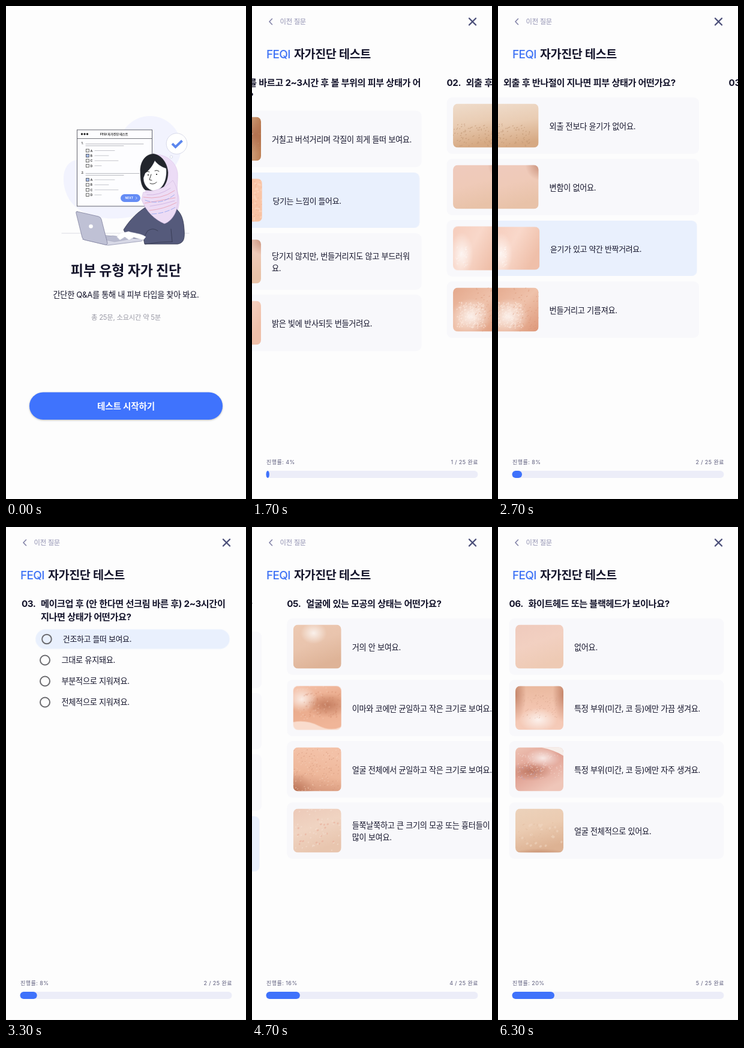
An HTML page that plays this animation: 400 by 820 pixels, repeating every 6400 ms.

```html
<!DOCTYPE html>
<html lang="ko">
<head>
<meta charset="utf-8">
<title>피부 유형 자가 진단</title>
<style>
html, body { margin: 0; width: 100%; height: 100%; overflow: hidden; background: #fdfdfd; }
svg { display: block; width: 100vw; height: 100vh; overflow: hidden; }
text { font-family: Inter, "Noto Sans CJK KR", "Noto Sans CJK", sans-serif; fill: #14142b; }
.ask { font-size: 15.2px; font-weight: 700; letter-spacing: -.45px; word-spacing: .03em; }
.opt { font-size: 13.2px; letter-spacing: -.32px; }
.name { font-size: 19.6px; font-weight: 700; letter-spacing: -.45px; word-spacing: .03em; }
.name.brand { font-size: 19px; font-weight: 500; letter-spacing: -.65px; fill: #3f73f5; }
.back { font-size: 11.3px; letter-spacing: -.25px; fill: #8f8fb0; }
.stat { font-size: 9px; letter-spacing: .5px; word-spacing: -.03em; fill: #5c5c7c; }
.tiny { font-size: 5.4px; font-weight: 600; fill: #333; }
.press { transform-box: fill-box; transform-origin: center; }
</style>
</head>
<body>
<svg id="stage" viewBox="0 0 400 820">
  <defs>
    <clipPath id="round"><rect width="80" height="73" rx="8"/></clipPath>
    <radialGradient id="glow">
      <stop stop-color="#fff" stop-opacity=".75"/><stop offset="1" stop-color="#fff" stop-opacity="0"/>
    </radialGradient>
    <radialGradient id="shade">
      <stop stop-color="#a4583c" stop-opacity=".55"/><stop offset="1" stop-color="#a4583c" stop-opacity="0"/>
    </radialGradient>
  </defs>
</svg>
<script>
const LOOP = 6400, SLIDE = 450;
const BRAND = 'FEQI', TITLE = '자가진단 테스트';
let css = '', defs = '', seed = 7, uid = 0;

const rand = () => (seed = seed * 16807 % 2147483647) / 2147483647;
const text = (x, y, cls, s, more = '') => `<text x="${x}" y="${y}" class="${cls}" ${more}>${s}</text>`;
const path = (d, stroke, w = 1, fill = 'none', more = '') =>
  `<path d="${d}" stroke="${stroke}" stroke-width="${w}" fill="${fill}" stroke-linecap="round" stroke-linejoin="round" ${more}/>`;
const rect = (x, y, w, h, r, fill, more = '') =>
  `<rect x="${x}" y="${y}" width="${w}" height="${h}" rx="${r}" fill="${fill}" ${more}/>`;
const circle = (x, y, r, fill, more = '') => `<circle cx="${x}" cy="${y}" r="${r}" fill="${fill}" ${more}/>`;

// Stops are [ms, declarations].
function animate(id, stops, easing = 'ease-in-out') {
  const body = stops.map(([t, p]) => `${t / LOOP * 100}%{${p}}`).join('');
  css += `@keyframes ${id}{${body}}#${id}{animation:${id} ${LOOP}ms ${easing} infinite}`;
}
function slide(id, enter, leave) {
  const x = v => `transform:translateX(${v}px)`;
  const stops = enter ? [[0, x(400)], [enter, x(400)], [enter + SLIDE, x(0)]] : [[0, x(0)]];
  if (leave) stops.push([leave, x(0)], [leave + SLIDE, x(-400)], [LOOP, x(-400)]);
  else stops.push([LOOP, x(0)]);
  animate(id, stops);
}
function press(id, at) {
  const s = v => `transform:scale(${v})`;
  animate(id, [[0, s(1)], [at, s(1)], [at + 100, s(.98)], [LOOP, s(.98)]], 'linear');
}
function show(id, from, to = LOOP) {
  const o = v => `opacity:${v}`;
  const stops = from ? [[0, o(0)], [from, o(1)]] : [[0, o(1)]];
  if (to < LOOP) stops.push([to, o(0)]);
  stops.push([LOOP, o(to < LOOP ? 0 : 1)]);
  animate(id, stops, 'step-end');
}

// Skin swatches: tones, gradient end, soft spots [kind,cx,cy,rx,ry], flecks [count,colour,size,x,y,w,h].
const SMOOTH = { tones: ['#efcabd', '#efcab8', '#e8c2a8'], end: [.3, 1], spots: [['shade', 84, 0, 26, 26]] };
const SHINY = { tones: ['#f6cdbd', '#f9d8ca', '#efbfa9'], end: [1, .5], spots: [['glow', 14, 46, 20, 36]],
  flecks: [[45, '#fff', 1, 4, 34, 20, 34]] };
const SKINS = {
  flaky: { tones: ['#dfb890', '#e5c8ae', '#bd7f54'], end: [1, 0], spots: [['shade', 70, 30, 26, 30], ['shade', 34, 20, 8, 8]],
    flecks: [[150, '#f5eadf', 1.1, 0, 25, 66, 48], [60, '#c79a77', 1, 0, 10, 80, 60]] },
  tight: { tones: ['#f4ae8d', '#fac7a9', '#f8c0a0'], end: [1, 1],
    flecks: [[110, '#fddcc6', 2.6, 0, 6, 80, 67], [90, '#f0a988', 1.3, 0, 0, 80, 73]] },
  smooth: SMOOTH,
  shiny: SHINY,
  dull: { tones: ['#efdccb', '#e9ccb3', '#d6a983'], end: [.2, 1], flecks: [[85, '#b98d6b', 1.3, 0, 34, 66, 38]] },
  oily: { tones: ['#e4a88c', '#efc2ab', '#dd9778'], end: [1, 1], spots: [['glow', 30, 48, 34, 30]],
    flecks: [[150, '#fff3ec', 1.5, 6, 24, 48, 44], [60, '#d58d6e', 1.1, 36, 0, 44, 73]] },
  partly: { tones: ['#e8c6aa', '#efcdbe', '#e2a38e'], end: [.4, 1], spots: [['glow', 34, 44, 44, 22]],
    flecks: [[50, '#fff', .8, 6, 30, 54, 30]] },
  tzone: { tones: ['#ecc4a2', '#f1d0b5', '#e9bd9b'], end: [1, 1], spots: [['glow', 40, 40, 26, 30]],
    flecks: [[65, '#fbeadb', 1.2, 4, 6, 70, 62], [16, '#dc9d80', 1.5, 4, 6, 70, 62]] },
  greasy: { tones: ['#a95c46', '#d99780', '#efbfae'], end: [.5, 1], spots: [['glow', 42, 34, 32, 24], ['shade', 8, 10, 36, 26]],
    flecks: [[110, '#fbe5dc', 1.2, 14, 8, 60, 44], [40, '#b76b55', 1.1, 0, 0, 60, 50]] },
  clear: { tones: ['#edc9b2', '#e9c4ad', '#deb397'], end: [.4, 1], spots: [['glow', 34, 14, 22, 18]] },
  nosePores: { tones: ['#f5c2aa', '#eaab8c', '#f0b598'], end: [.3, 1], spots: [['shade', 56, 32, 38, 20], ['glow', 14, 22, 26, 22]],
    flecks: [[80, '#c87c5e', 1.2, 16, 10, 62, 42], [50, '#f9d8c6', 1.3, 0, 0, 60, 56]],
    shape: ['M0 60Q22 56 42 66T80 68V73H0Z', '#f9dccd'] },
  allPores: { tones: ['#f3c1a7', '#eeb79a', '#cf8e72'], end: [-.2, 1], spots: [['shade', 0, 73, 36, 30]],
    flecks: [[100, '#cf8f74', 1.2, 0, 4, 80, 67], [90, '#f8d3be', 1.3, 0, 0, 80, 73]] },
  scars: { tones: ['#ecc9b8', '#f0d4c2', '#e8c5ae'], end: [.4, 1],
    flecks: [[20, '#e8a592', 2.6, 4, 16, 72, 44], [50, '#f8e4d8', 1.8, 0, 0, 80, 73]] },
  plain: { tones: ['#efcabd', '#f2d0c1', '#eecab4'], end: [.4, 1] },
  nose: { tones: ['#eab99f', '#f3c5b0', '#f5cbb9'], end: [0, 1], spots: [['shade', 0, 14, 18, 46], ['shade', 80, 14, 18, 46], ['glow', 38, 56, 32, 20]],
    flecks: [[75, '#d19c84', 1, 12, 14, 56, 40]] },
  chin: { tones: ['#eec3b4', '#e0a092', '#efc6b9'], end: [.6, 1], spots: [['shade', 26, 40, 36, 16], ['glow', 46, 18, 30, 16]],
    flecks: [[100, '#fae4dc', 1.2, 4, 10, 72, 42], [28, '#a5a8dc', 1, 4, 30, 40, 24]], shape: ['M42 0H80V14Q64 4 42 0Z', '#f6eeea'] },
  bumps: { tones: ['#ecd2bb', '#ebcbb1', '#ddb293'], end: [.3, 1], spots: [['shade', 40, 78, 50, 12]],
    flecks: [[20, '#f2dac5', 3.4, 2, 26, 76, 38], [45, '#ddb697', 1.2, 0, 20, 80, 50]] }
};
function photo(key, x, y) {
  const { tones, end, spots = [], flecks = [], shape } = SKINS[key], id = 'skin' + uid++;
  defs += `<linearGradient id="${id}" x1="0" y1="0" x2="${end[0]}" y2="${end[1]}">` +
    tones.map((c, i) => `<stop offset="${i / 2}" stop-color="${c}"/>`).join('') + '</linearGradient>';
  let s = rect(0, 0, 80, 73, 0, `url(#${id})`);
  for (const [kind, cx, cy, rx, ry] of spots)
    s += `<ellipse cx="${cx}" cy="${cy}" rx="${rx}" ry="${ry}" fill="url(#${kind})"/>`;
  for (const [n, color, size, fx, fy, w, h] of flecks) {
    let d = '';
    for (let i = 0; i < n; i++) d += `M${(fx + rand() * w).toFixed(1)} ${(fy + rand() * h).toFixed(1)}l${(rand() * 1.4).toFixed(1)} -.6`;
    s += path(d, color, size, 'none', 'opacity=".5"');
  }
  if (shape) s += `<path d="${shape[0]}" fill="${shape[1]}"/>`;
  return `<g transform="translate(${x} ${y})" clip-path="url(#round)">${s}</g>`;
}

const PAGES = [
  { enter: 0, leave: 1550, pick: 1, hover: 1400, down: 1400, x: 47.5,
    ask: ['보습제를 바르고 2~3시간 후 볼 부위의 피부 상태가 어', '떤가요?'],
    opts: [['flaky', '거칠고 버석거리며 각질이 희게 들떠 보여요.'], ['tight', '당기는 느낌이 들어요.'],
      ['smooth', '당기지 않지만, 번들거리지도 않고 부드러워', '요.'], ['shiny', '밝은 빛에 반사되듯 번들거려요.']] },
  { enter: 1550, leave: 2600, pick: 2, hover: 2400, down: 2420, x: 50.5,
    ask: ['외출 후 반나절이 지나면 피부 상태가 어떤가요?'],
    opts: [['dull', '외출 전보다 윤기가 없어요.'], ['smooth', '변함이 없어요.'],
      ['shiny', '윤기가 있고 약간 반짝거려요.'], ['oily', '번들거리고 기름져요.']] },
  { enter: 2600, leave: 3400, pick: 0, hover: 3150, down: 3190, x: 58, radio: true,
    ask: ['메이크업 후 (안 한다면 선크림 바른 후) 2~3시간이', '지나면 상태가 어떤가요?'],
    opts: [['', '건조하고 들떠 보여요.'], ['', '그대로 유지돼요.'], ['', '부분적으로 지워져요.'], ['', '전체적으로 지워져요.']] },
  { enter: 3400, leave: 4350, pick: 3, hover: 4150, down: 4145, x: 51.5,
    ask: ['평소 얼굴에 유분감(번들거리고 답답함)이 느껴지나', '요?'],
    opts: [['smooth', '없어요.'], ['partly', '간혹 일부 부위만 번들거려요.'],
      ['tzone', 'T존(이마, 코 부위)이 주로 번들거려요.'], ['greasy', '얼굴 전체가 번들거려요.']] },
  { enter: 4350, leave: 5600, pick: 1, hover: 5300, down: 5430, x: 50.5,
    ask: ['얼굴에 있는 모공의 상태는 어떤가요?'],
    opts: [['clear', '거의 안 보여요.'], ['nosePores', '이마와 코에만 균일하고 작은 크기로 보여요.'],
      ['allPores', '얼굴 전체에서 균일하고 작은 크기로 보여요.'], ['scars', '들쭉날쭉하고 큰 크기의 모공 또는 흉터들이', '많이 보여요.']] },
  { enter: 5600, x: 50.5,
    ask: ['화이트헤드 또는 블랙헤드가 보이나요?'],
    opts: [['plain', '없어요.'], ['nose', '특정 부위(미간, 코 등)에만 가끔 생겨요.'],
      ['chin', '특정 부위(미간, 코 등)에만 자주 생겨요.'], ['bumps', '얼굴 전체적으로 있어요.']] }
];

function option(p, n, i) {
  const [skin, ...lines] = p.opts[i], picked = p.pick === i, id = `pick${n}`;
  const y = p.radio ? 169.7 + 35 * i : (p.ask.length > 1 ? 174 : 152) + 102 * i;
  const box = (fill, more) => p.radio ? rect(46, y, 330, 33.6, 16.8, fill, more) : rect(18.5, y, 358, 94, 9, fill, more);
  let s = box(p.radio ? 'none' : '#f8f8fb');
  if (picked) {
    s += box('#e9f0fd', `id="${id}"`);
    show(id, p.hover);
    press(id + 'press', p.down);
  }
  if (p.radio)
    s += circle(65, y + 16.8, 8, 'none', 'stroke="#6a6a6e" stroke-width="2"') + text(92.5, y + 21.6, 'opt', lines[0]);
  else
    s += photo(skin, 29, y + 10.5) +
      lines.map((l, k) => text(127, y + (lines.length > 1 ? 43 + 20 * k : 53), 'opt', l)).join('');
  return `<g class="press" ${picked ? `id="${id}press"` : ''}>${s}</g>`;
}
function page(p, i) {
  const n = i + 1;
  slide('page' + n, p.enter, p.leave);
  show('stat' + n, p.enter, p.leave);
  const ask = text(p.radio ? 26 : 18.5, 132.5, 'ask', `0${n}.`) +
    p.ask.map((l, k) => text(p.x, 132.5 + 22 * k, 'ask', l)).join('');
  return `<g id="page${n}">${ask}${p.opts.map((_, k) => option(p, n, k)).join('')}</g>
    <g id="stat${n}">${text(24, 762.3, 'stat', `진행률: ${i * 4}%`)}${text(377, 762.3, 'stat', `${i} / 25 완료`, 'text-anchor="end"')}</g>`;
}

function quiz() {
  slide('quiz', 250);
  show('back', PAGES[1].enter);
  const w = v => `width:${v * 14.1}px`, stops = [[0, w(0)]];
  PAGES.slice(1).forEach((p, i) => stops.push([p.enter, w(i)], [p.enter + 350, w(i + 1)]));
  animate('bar', [...stops, [LOOP, w(5)]]);
  return `<g id="quiz">
    <g id="back">${path('M33.5 21.3L29 26L33.5 30.7', '#8080a6', 1.6)}${text(46.5, 30.2, 'back', '이전 질문')}</g>
    ${path('M362 20.5L373 31.5M373 20.5L362 31.5', '#4a4e78', 2.3)}
    ${text(24, 86.5, 'name brand', BRAND)}${text(70, 87, 'name', TITLE)}
    ${rect(23.5, 773, 353, 12, 6, '#ecedf8')}${rect(23.5, 773, 0, 12, 6, '#3f72fb', 'id="bar"')}
    ${rect(0, 819, 400, 1, 0, '#f5f5f7')}
    ${PAGES.map(page).join('')}</g>`;
}

function sheet() {
  let s = rect(118.5, 206, 125, 127, 0, '#fdfdff', 'stroke="#55565f" stroke-width=".9"') + path('M118.5 220.5H243.5', '#55565f', .8);
  for (const x of [126.5, 131, 135.5]) s += circle(x, 213, 1.7, '#222');
  s += text(180, 215, 'tiny', `${BRAND} ${TITLE}`, 'text-anchor="middle" style="font-size:5.1px;font-weight:700"');
  [[228, 240.5, 1], [277, 289, 0]].forEach(([y, top, checked], q) => {
    s += text(125.5, y + 2.2, 'tiny', `${q + 1}.`) + path(`M133 ${y + 1.5}H${q ? 222 : 229}M133 ${y + 4.5}H196`, '#8c8d96', .6);
    [33, 23, 39, 11].forEach((w, i) => {
      const oy = top + 8.4 * i;
      s += rect(133.5, oy - 2.4, 4.8, 4.8, 0, i === checked ? '#a9c0fa' : '#fff', 'stroke="#444" stroke-width=".8"') +
        text(140.5, oy + 2, 'tiny', 'ABCD'[i]) + path(`M148 ${oy}h${w}`, '#a0a1aa', .6);
    });
  });
  return s + rect(191, 313, 33, 13, 6.5, '#658cf5') +
    text(198.5, 321.4, 'tiny', 'NEXT', 'style="fill:#fff;font-size:5px"') + path('M216.5 317.8l1.6 1.7l-1.6 1.7', '#fff', .8);
}
function woman() {
  const ink = '#33364d', navy = '#555a7b';
  return path('M247 247C266 246 284 259 286 278C287 292 283 303 288 317C290 332 286 345 275 356L238 346L232 312Z', '#d8bfe6', .6, '#ecdcf6') +
    path('M234 334C222 341 208 353 196 372C199 381 207 386 214 387L229 386L231 396H286C297 394 298 386 297 372C296 354 292 344 282 336Z', ink, .8, navy) +
    path('M229 386L236 374C244 369 248 371 253 374M275 371L277 392M232 396Q255 392 277 392', ink, .8) +
    path('M246 246C260 248 269 262 270 277C270 291 264 302 255 308L232 306C225 300 224 288 224 276C223 260 232 246 246 246Z', '#22252c', .5, '#22252c') +
    path('M232 278C240 272 245 264 248 257C252 263 260 268 267 270C269 288 262 304 249 308C240 308 229 300 229 286Z', ink, .4, '#fff') +
    path('M233 276q3 -2 6 0M248 274q4 -2 7 1M242 280l-3 9l4 1M240 295q6 3 11 -2', '#222', .9) +
    circle(237, 281, 1.1, '#222') + circle(251, 280, 1.1, '#222') +
    path('M229 310C243 308 262 306 278 290C287 302 288 323 284 339C280 352 271 360 264 362C248 355 234 343 226 322Z', '#cfb7de', .6, '#eddcf5') +
    path('M229 318Q258 323 281 307M231 328Q254 324 282 319M239 340Q263 338 284 327', '#e9a9bd', 1) +
    path('M232 323Q258 333 283 312M243 346Q265 345 282 335', '#8aa0ef', .8, 'none', 'stroke-dasharray="8 3"') +
    path('M235 314Q255 316 274 303M240 333Q262 330 281 324', '#c7a7dc', .7);
}
function intro() {
  slide('intro', 0, 250);
  press('start', 100);
  const mid = (y, size, weight, gap, color, s) =>
    text(200, y, '', s, `text-anchor="middle" style="font-size:${size}px;font-weight:${weight};letter-spacing:${gap}px;fill:${color}"`);
  return `<g id="intro">
    ${circle(240, 235, 52, '#f2f3fe')}
    <path d="M118 256C88 260 91 309 113 331C142 361 205 358 241 340L285 308L245 230Z" fill="#f2f3fe"/>
    ${sheet()}${path('M93 378H305', '#d2d3dc', .8)}
    ${circle(284.5, 229, 17.3, '#fff', 'stroke="#d0d2e4" stroke-width=".8"')}
    ${path('M277 229L282.5 234.5L293.5 224', '#5c87ee', 4, 'none', 'style="stroke-linecap:butt;stroke-linejoin:miter"')}
    ${circle(275.5, 251, 2.2, '#fff', 'stroke="#d0d2e4" stroke-width=".8"')}
    ${woman()}
    ${path('M128 388L160 381L229 388L226 391L170 398Z', '#8688a5', .7, '#d7d8e6')}
    ${path('M152 386L178 382L210 387L181 392Z', '#9a9cb5', .5, '#babcd0')}
    ${path('M185 384C190 374 198 378 204 375C212 378 225 378 233 384L229 389L213 385L205 389L198 384L190 389Z', '#e2e2ea', .5, '#fff')}
    ${path('M119 342L154 350Q158 351 159 355L169 394Q169 398 165 397L131 389Q128 388 127 385L117 345Q116 341 119 342Z', '#7f819e', .8, '#bfc1d5')}
    ${circle(141.5, 366.5, 3.3, '#fff')}
    ${mid(447.5, 23, 700, -.12, '#14142b', '피부 유형 자가 진단')}
    ${mid(485, 13.2, 400, -.32, '#14142b', '간단한 Q&amp;A를 통해 내 피부 타입을 찾아 봐요.')}
    ${mid(522.3, 11.3, 400, -.22, '#9a9aa6', '총 25문, 소요시간 약 5분')}
    <g id="start" class="press">
      ${rect(39, 642.5, 322, 45.5, 22.75, '#3f73fd', 'style="filter:drop-shadow(0 1.5px 1.5px rgba(0,0,0,.28))"')}
      ${mid(670.5, 14.6, 700, -.2, '#fff', '테스트 시작하기')}
    </g></g>`;
}

const stage = document.getElementById('stage');
const scene = intro() + quiz();
stage.querySelector('defs').innerHTML += defs;
stage.insertAdjacentHTML('beforeend', scene);
document.head.appendChild(document.createElement('style')).textContent = css;
</script>
</body>
</html>
```
